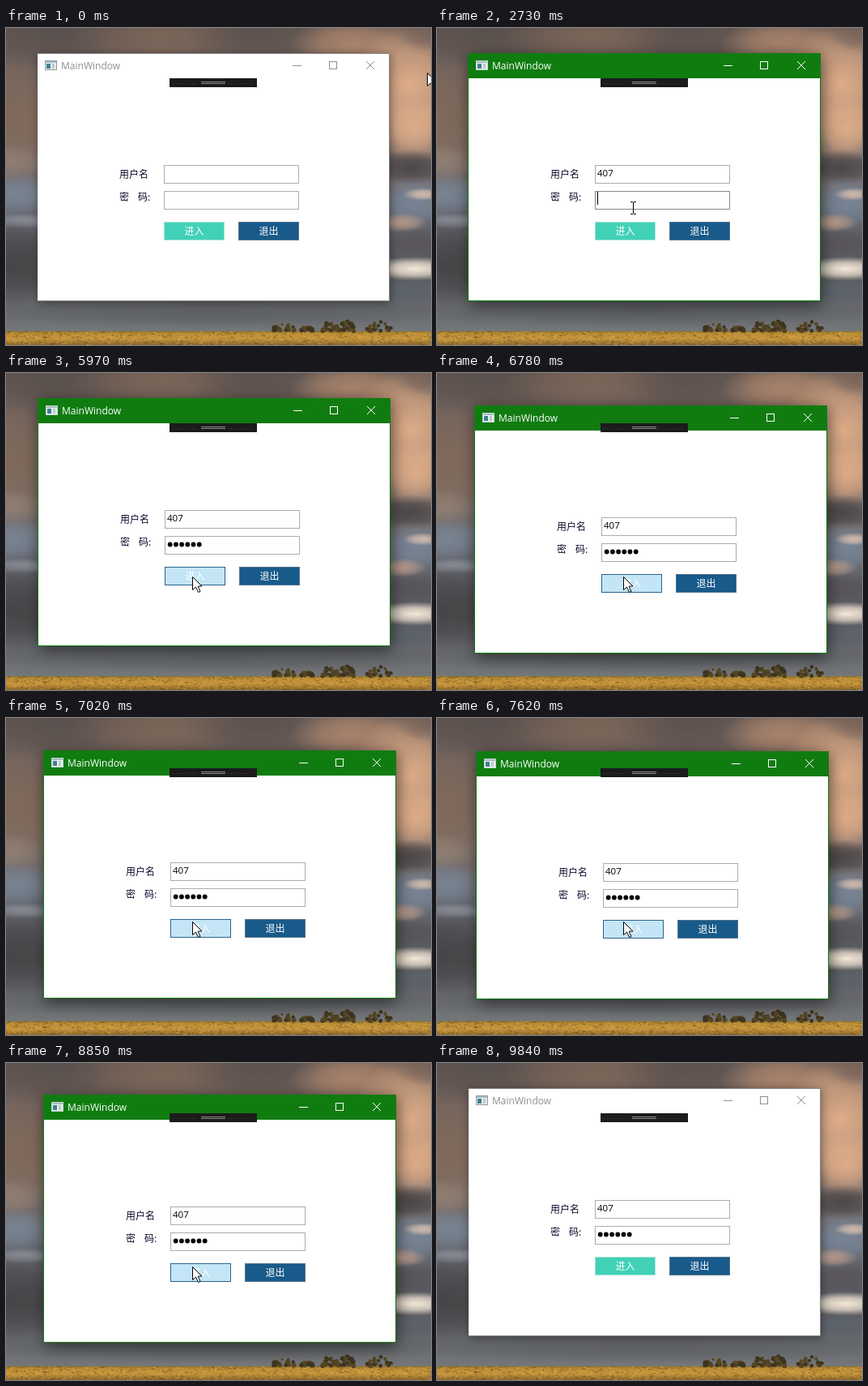
Recreate the animation shown at these times as an HTML page with a canvas. Size 525 by 391 pixels, loop 9.93 s.

```html
<!DOCTYPE html>
<html lang="zh-CN">
<head>
<meta charset="utf-8">
<title>MainWindow</title>
<style>
html, body { margin: 0; width: 100%; height: 100%; overflow: hidden; background: #5c5856; }
canvas { display: block; }
</style>
</head>
<body>
<canvas id="stage" width="525" height="391"></canvas>
<script>
const W = 525, H = 391, LOOP = 9930, STEP = 30;
const ctx = document.getElementById('stage').getContext('2d');
const UI = '"Open Sans", "Noto Sans", sans-serif';
const CJK = '"Noto Sans CJK SC", "Noto Sans CJK", sans-serif';
const USER = '407';

// Time of mouse press and of the shake that follows
const shakes = [[5820, 5848], [6690, 6703], [7440, 7451], [8640, 8651]];
const SHAKE_MS = 345, SHAKE_AMP = 12;
const userKeys = [1200, 1410, 1560];
const passKeys = [3690, 3900, 4080, 4290, 4440, 4590];
const FOCUS_USER = 390, FOCUS_PASS = 2730, ACTIVE_END = 9840;
const hiddenCursor = [[1230, 2340], [3750, 5070]];

// Pointer track: time, x, y
const track = [
  [0, 520, 55], [30, 447, 104], [60, 358, 137], [90, 323, 139], [120, 285, 139],
  [150, 277, 139], [180, 271, 139], [330, 271, 139], [360, 266, 150], [390, 260, 174],
  [660, 254, 182], [2310, 254, 182], [2340, 254, 187], [2430, 242, 222], [5070, 242, 222],
  [5220, 247, 328], [5340, 247, 310], [5430, 237, 288], [5520, 234, 277], [5670, 230, 251],
  [9090, 230, 251], [9240, 262, 236], [9360, 322, 202], [9450, 388, 166], [9480, 441, 127],
  [9510, 490, 85], [9540, 535, 55]
];

function rect(c, x, y, w, h, fill) {
  c.fillStyle = fill;
  c.fillRect(x, y, w, h);
}

function frame(x, y, w, h, fill, edge) {
  rect(ctx, x, y, w, h, edge);
  rect(ctx, x + 1, y + 1, w - 2, h - 2, fill);
}

function text(s, x, y, fill, font, align = 'left') {
  ctx.font = font;
  ctx.fillStyle = fill;
  ctx.textAlign = align;
  ctx.fillText(s, x, y);
}

function lines(pts, color) {
  ctx.strokeStyle = color;
  ctx.lineWidth = 1;
  ctx.beginPath();
  for (const [x1, y1, x2, y2] of pts) {
    ctx.moveTo(x1, y1);
    ctx.lineTo(x2, y2);
  }
  ctx.stroke();
}

function random(seed) {
  return () => (seed = (seed * 16807) % 2147483647) / 2147483647;
}

function cloud(c, x, y, rx, ry, rgb, alpha) {
  c.save();
  c.translate(x, y);
  c.scale(rx, ry);
  const g = c.createRadialGradient(0, 0, 0, 0, 0, 1);
  g.addColorStop(0, `rgba(${rgb},${alpha})`);
  g.addColorStop(0.5, `rgba(${rgb},${alpha * 0.7})`);
  g.addColorStop(1, `rgba(${rgb},0)`);
  c.fillStyle = g;
  c.fillRect(-1, -1, 2, 2);
  c.restore();
}

function paintLandscape() {
  const cv = document.createElement('canvas');
  cv.width = W;
  cv.height = H;
  const c = cv.getContext('2d');
  const sky = c.createLinearGradient(0, 0, 0, 374);
  sky.addColorStop(0, '#6b5d56');
  sky.addColorStop(0.4, '#80706a');
  sky.addColorStop(0.6, '#686a72');
  sky.addColorStop(0.8, '#55565b');
  sky.addColorStop(1, '#74777a');
  rect(c, 0, 0, W, H, sky);

  const warm = '228,176,138', brown = '128,104,88', dark = '68,64,66', blue = '122,137,156';
  cloud(c, 60, 5, 130, 50, dark, 0.45);
  cloud(c, 190, 12, 110, 34, brown, 0.7);
  cloud(c, 310, 8, 90, 40, dark, 0.4);
  cloud(c, 15, 110, 60, 70, brown, 0.8);
  cloud(c, 5, 165, 45, 22, '150,132,118', 0.7);
  cloud(c, 12, 205, 50, 26, blue, 0.8);
  cloud(c, 20, 238, 45, 10, '150,155,165', 0.7);
  cloud(c, 10, 290, 70, 55, dark, 0.8);
  cloud(c, 430, 20, 80, 32, '184,140,112', 0.8);
  cloud(c, 500, 70, 75, 75, warm, 0.95);
  cloud(c, 505, 125, 50, 40, warm, 0.9);
  cloud(c, 520, 8, 40, 20, '120,98,88', 0.7);
  cloud(c, 500, 172, 50, 22, dark, 0.85);
  cloud(c, 505, 215, 50, 32, blue, 0.85);
  cloud(c, 515, 205, 25, 8, '230,200,180', 0.8);
  cloud(c, 490, 240, 30, 12, '196,160,140', 0.8);
  cloud(c, 505, 265, 55, 18, '88,84,88', 0.9);
  cloud(c, 505, 297, 60, 15, '245,232,215', 1);
  cloud(c, 500, 324, 90, 16, '92,98,108', 0.9);
  cloud(c, 260, 350, 330, 20, '88,90,94', 0.7);

  const grass = c.createLinearGradient(0, 372, 0, H);
  grass.addColorStop(0, '#6d5a26');
  grass.addColorStop(0.25, '#b98c35');
  grass.addColorStop(0.6, '#c6953c');
  grass.addColorStop(1, '#88652a');
  rect(c, 0, 374, W, H - 374, grass);
  const rnd = random(77);
  for (let i = 0; i < 900; i++) {
    const tone = rnd() < 0.5 ? 'rgba(80,56,20,0.4)' : 'rgba(232,186,84,0.4)';
    rect(c, rnd() * W, 374 + rnd() * 17, 1 + rnd() * 3, 1, tone);
  }
  // tree clumps on the horizon
  for (const [x, w, h] of [[343, 26, 10], [372, 16, 6], [400, 20, 12], [420, 20, 12], [461, 30, 12]]) {
    for (let i = 0; i < 26; i++) {
      const dx = rnd() - 0.5;
      const top = h * (1 - 2.4 * dx * dx);
      c.fillStyle = rnd() < 0.5 ? '#3d3420' : '#564520';
      c.beginPath();
      c.arc(x + dx * w, 374 - rnd() * top, 1.6 + rnd() * 1.2, 0, 7);
      c.fill();
    }
  }
  return cv;
}

const landscape = paintLandscape();

function pointerAt(t) {
  let i = track.findIndex(k => k[0] > t);
  if (i < 0) i = track.length - 1;
  const [t0, x0, y0] = track[i - 1], [t1, x1, y1] = track[i];
  const p = Math.min(1, (t - t0) / (t1 - t0));
  return [Math.round(x0 + (x1 - x0) * p), Math.round(y0 + (y1 - y0) * p)];
}

function swing(t) {
  const p = (t % 120) / 60;
  return Math.round(SHAKE_AMP * (p < 1 ? p : 2 - p));
}

function shakeAt(t) {
  for (const [press, start] of shakes) {
    const dt = t - start;
    if (t >= press && dt < SHAKE_MS)
      return dt < 0 ? [0, 0, true] : [swing(dt + 2.5), swing(dt), true];
  }
  return [0, 0, false];
}

const within = (x, y, l, t, r, b) => x >= l && x < r && y >= t && y < b;
const typed = (keys, t) => keys.filter(k => k <= t).length;

function drawCaret(t, nUser, nPass) {
  if (t < FOCUS_USER || t >= shakes[0][0]) return;
  const pass = t >= FOCUS_PASS;
  const last = pass ? passKeys[nPass - 1] || FOCUS_PASS : userKeys[nUser - 1] || FOCUS_USER;
  if ((t - last) % 1020 >= 530) return;
  const x = 198 + Math.floor(pass ? nPass * 7.2 : nUser * 6.5);
  rect(ctx, x, pass ? 202 : 170, 1, 16, '#000');
}

function drawTitleBar(active) {
  const ink = active ? '#fff' : '#8f8f8f';
  if (active) rect(ctx, 39, 31, 435, 31, '#107c10');
  frame(48, 40, 15, 12, '#e9eef0', active ? '#c7d8cf' : '#8a9aa3');
  rect(ctx, 49, 41, 13, 2, '#a9bcc6');
  rect(ctx, 50, 44, 5, 6, '#3f7f93');
  rect(ctx, 57, 44, 3, 6, '#bccbc8');
  text('MainWindow', 68, 51, ink, '12px ' + UI);
  lines([[354, 46.5, 365, 46.5], [445, 41, 455, 51], [455, 41, 445, 51]], ink);
  ctx.strokeRect(399.5, 41.5, 9, 9);
}

function drawWindow(t, dx, dy, pressed, px, py) {
  const active = t >= FOCUS_USER && t < ACTIVE_END;
  const nUser = typed(userKeys, t), nPass = typed(passKeys, t);
  ctx.save();
  ctx.translate(dx, dy);

  ctx.save();
  ctx.shadowColor = active ? 'rgba(0,0,0,0.55)' : 'rgba(0,0,0,0.4)';
  ctx.shadowBlur = active ? 18 : 10;
  ctx.shadowOffsetX = 1;
  ctx.shadowOffsetY = active ? 4 : 2;
  rect(ctx, 39, 31, 435, 306, active ? '#107c10' : '#8c8886');
  ctx.restore();
  rect(ctx, 39, 32, 434, 304, '#fff');
  if (active) {
    ctx.strokeStyle = '#107c10';
    ctx.lineWidth = 1;
    ctx.strokeRect(38.5, 31.5, 435, 305);
  }
  drawTitleBar(active);

  const label = '12px ' + CJK, navy = '#0b0b2e';
  text('用户名', 140, 185, navy, label);
  text('密', 140, 213, navy, label);
  text('码:', 163, 213, navy, label);

  const focusUser = t >= FOCUS_USER && t < FOCUS_PASS;
  const focusPass = t >= FOCUS_PASS && t < shakes[0][0];
  frame(195, 169, 167, 23, '#fff', focusUser ? '#85898f' : '#abadb3');
  frame(195, 201, 167, 23, '#fff', focusPass ? '#85898f' : '#abadb3');
  text(USER.slice(0, nUser), 198, 183, '#000', '11.5px ' + UI);
  ctx.fillStyle = '#000';
  for (let i = 0; i < nPass; i++) {
    ctx.beginPath();
    ctx.arc(201.7 + i * 7.2, 211.5, 2.9, 0, 7);
    ctx.fill();
  }
  drawCaret(t, nUser, nPass);

  const hover = within(px - dx, py - dy, 195, 239, 270, 262);
  if (pressed) frame(195, 239, 75, 23, '#c4e5f6', '#2c628b');
  else if (hover) frame(195, 239, 75, 23, '#bee6fd', '#3c7fb1');
  else frame(195, 239, 75, 23, '#41d1b7', '#a5e3d8');
  text('进入', 232.5, 255, '#fff', label, 'center');
  frame(287, 239, 75, 23, '#185a8a', '#56748c');
  text('退出', 324.5, 255, '#fff', label, 'center');
  ctx.restore();
}

function drawToolbar() {
  rect(ctx, 202, 62, 108, 11, '#1b1b1c');
  for (let x = 206; x < 306; x += 4) {
    if (x > 236 && x < 274) continue;
    rect(ctx, x, 68, 1, 1, '#4a4a4c');
  }
  rect(ctx, 241, 66, 30, 1, '#8a8a8a');
  rect(ctx, 241, 68, 30, 1, '#8a8a8a');
}

function drawArrow(x, y) {
  const pts = [[0, 0], [0, 16], [4, 12.5], [7, 19], [9.5, 18], [6.7, 11.7], [11.5, 11.5]];
  ctx.beginPath();
  for (const [px, py] of pts) ctx.lineTo(x + px + 0.5, y + py + 0.5);
  ctx.closePath();
  ctx.fillStyle = '#fff';
  ctx.fill();
  ctx.strokeStyle = '#000';
  ctx.lineWidth = 1;
  ctx.stroke();
}

function drawBeam(x, y) {
  rect(ctx, x, y - 7, 1, 14, '#000');
  for (const end of [y - 8, y + 7]) {
    rect(ctx, x - 3, end, 3, 1, '#000');
    rect(ctx, x + 1, end, 3, 1, '#000');
  }
}

function drawPointer(t, x, y) {
  if (hiddenCursor.some(([a, b]) => t >= a && t < b)) return;
  const inField = within(x, y, 195, 169, 362, 192) || within(x, y, 195, 201, 362, 224);
  (inField ? drawBeam : drawArrow)(x, y);
}

function draw(t) {
  const [dx, dy, pressed] = shakeAt(t);
  const [px, py] = pointerAt(t);
  ctx.drawImage(landscape, 0, 0);
  drawWindow(t, dx, dy, pressed, px, py);
  drawToolbar();
  drawPointer(t, px, py);
}

const begin = performance.now();
function tick() {
  const t = (performance.now() - begin) % LOOP;
  draw(Math.floor(t / STEP) * STEP);
  requestAnimationFrame(tick);
}
tick();
</script>
</body>
</html>
```
